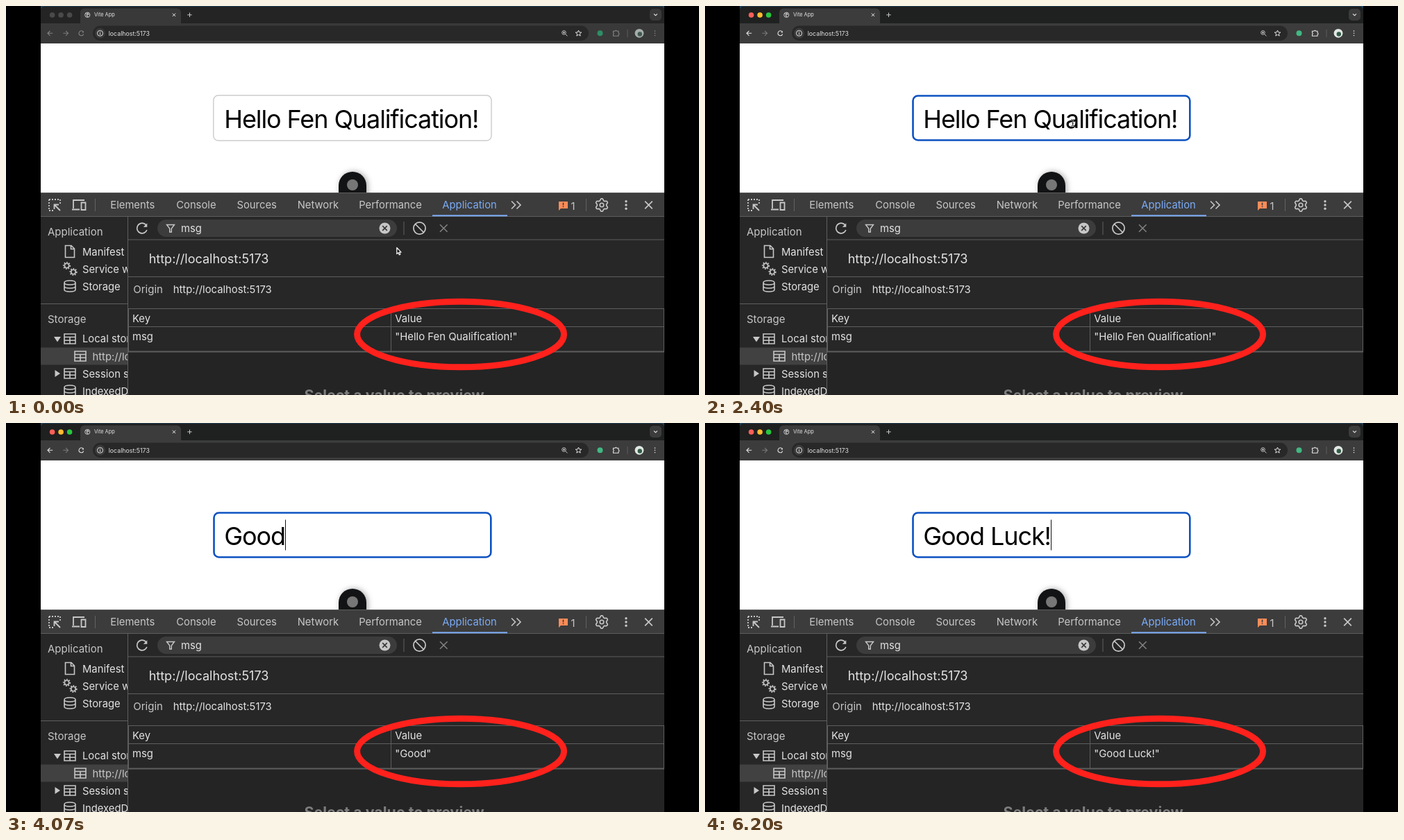
Animation of 998x561 px, one loop 6.33 s. Source, as an HTML page with a canvas:

```html
<!DOCTYPE html>
<html lang="en">
<head>
<meta charset="utf-8">
<title>Saved message</title>
<style>
html, body { margin: 0; width: 100%; height: 100%; overflow: hidden; background: #000; }
canvas { display: block; width: 998px; height: 561px; }
</style>
</head>
<body>
<canvas id="stage"></canvas>
<script>
const W = 998, H = 561, LOOP = 6330;
const canvas = document.getElementById('stage');
const ctx = canvas.getContext('2d');
const dpr = window.devicePixelRatio || 1;
canvas.width = W * dpr;
canvas.height = H * dpr;

const LIGHT = '#e3e3e3', GREY = '#c7c7c7', BAR = '#3c3c3c', PANEL = '#272727', LINE = '#5e5e5e', BLUE = '#7cacf8';
const GREETING = 'Hello Fen Qualification!';
const FAREWELL = 'Good Luck!';
const TYPED = [3330, 3600, 3930, 4070, 4200, 4470, 4600, 4730, 4870, 5200];
const SAVED = [3330, 3670, 3930, 4070, 4200, 4470, 4600, 4800, 4870, 5200];

function rect(x, y, w, h, color) {
  ctx.fillStyle = color;
  ctx.fillRect(x, y, w, h);
}

function round(x, y, w, h, r, color) {
  ctx.beginPath();
  ctx.roundRect(x, y, w, h, r);
  ctx.fillStyle = color;
  ctx.fill();
}

function disc(x, y, r, color) {
  ctx.beginPath();
  ctx.arc(x, y, r, 0, 7);
  ctx.fillStyle = color;
  ctx.fill();
}

function ring(x, y, r, color, width) {
  ctx.beginPath();
  ctx.arc(x, y, r, 0, 7);
  ctx.strokeStyle = color;
  ctx.lineWidth = width;
  ctx.stroke();
}

// Strokes, and optionally fills, an SVG path placed at x, y.
function icon(x, y, d, color, width = 1.5, fill) {
  const path = new Path2D(d);
  ctx.save();
  ctx.translate(x, y);
  if (fill) {
    ctx.fillStyle = fill;
    ctx.fill(path);
  }
  if (width) {
    ctx.strokeStyle = color;
    ctx.lineWidth = width;
    ctx.stroke(path);
  }
  ctx.restore();
}

function font(size, weight = 400, spacing = 0) {
  ctx.font = `${weight} ${size}px Inter, "Open Sans", sans-serif`;
  ctx.letterSpacing = spacing + 'px';
}

// y is the middle of the capital letters.
function text(str, x, y, color = LIGHT, size = 14.8, weight = 400) {
  font(size, weight);
  ctx.fillStyle = color;
  ctx.fillText(str, x, y + size * 0.364);
}

function mix(from, to, a) {
  const parts = from.map((v, i) => Math.round(v + (to[i] - v) * a));
  return `rgb(${parts.join()})`;
}

function cross(x, y, r, color, width) {
  icon(x, y, `M${-r} ${-r}L${r} ${r}M${r} ${-r}L${-r} ${r}`, color, width);
}

function dots(x, y, gap, r, color) {
  for (let i = -1; i <= 1; i++) disc(x, y + i * gap, r, color);
}

function reload(x, y, r, color, width) {
  ctx.beginPath();
  ctx.arc(x, y, r, 0.35, 5.6);
  ctx.strokeStyle = color;
  ctx.lineWidth = width;
  ctx.stroke();
  icon(x, y, `M${r} ${-r}V${-r * 0.25}H${r * 0.25}Z`, color, 0, color);
}

function browser(a) {
  rect(50, 0, 898, H, '#1d4664');
  round(50, 0.7, 898, 570, 5, mix([36, 36, 36], [31, 32, 32], a));
  const lit = mix([132, 132, 132], [227, 227, 227], a);
  const tool = mix([57, 57, 57], [60, 60, 60], a);

  [[255, 95, 87], [254, 188, 46], [40, 200, 64]].forEach((c, i) =>
    disc(66.6 + i * 12.5, 13, 3.8, mix([74, 74, 74], c, a)));

  round(107, 3.5, 145, 28, 6, tool);
  rect(50, 25, 898, 29, tool);
  ring(117.3, 12.8, 3.6, GREY, 1);
  icon(117.3, 12.8, 'M-3 -2L0 -1L-1 1L1 3M0 -3L2 0', GREY, 1.2);
  text('Vite App', 127, 12.7, LIGHT, 7.4);
  cross(242, 12.8, 2.2, LIGHT, 1);
  icon(264.5, 12.8, 'M-3.2 0H3.2M0 -3.2V3.2', GREY, 1);
  round(927, 4, 17, 17, 5, tool);
  icon(935.5, 12.5, 'M-2.5 -1.2L0 1.2L2.5 -1.2', LIGHT, 1.1);

  icon(63.5, 39.3, 'M3.7 0H-3.5M0 -3.5L-3.5 0L0 3.5', lit, 1.1);
  icon(86, 39.3, 'M-3.7 0H3.5M0 -3.5L3.5 0L0 3.5', '#7b7b7b', 1.1);
  reload(108.5, 39.3, 3.4, lit, 1.1);

  round(125, 28.5, 714, 21.5, 10.75, '#282828');
  disc(135.5, 39.3, 7.5, tool);
  ring(135.5, 39.3, 4, LIGHT, 1);
  icon(135.5, 39.3, 'M0 -2.3V-1.2M0 -.4V2.3', LIGHT, 1);
  text('localhost:5173', 147.7, 39.3, LIGHT, 8.8);
  ring(803.5, 38.4, 2.8, GREY, 1);
  icon(803.5, 38.4, 'M2 2L5 5M-1.5 0H1.5M0 -1.5V1.5', GREY, 1);
  icon(824.5, 39.3, 'M0 -4.3L1.2 -1.4L4.3 -1.2L1.9 .8L2.7 3.8L0 2.1L-2.7 3.8L-1.9 .8L-4.3 -1.2L-1.2 -1.4Z', LIGHT, 1);

  disc(855.5, 39.3, 4, mix([45, 142, 102], [65, 184, 131], a));
  icon(878.5, 39.3, 'M-4 -3H-1.5A1.4 1.4 0 0 1 1.2 -3H3.5V-.7A1.4 1.4 0 0 1 3.5 2V4H-4V1.8A1.4 1.4 0 0 0 -4 -.7Z', lit, 1.1);
  rect(894.5, 34, 1, 11, '#5c5c5c');
  disc(912, 39.3, 6.4, mix([165, 173, 170], [225, 232, 228], a));
  disc(912.8, 40.5, 3.2, mix([65, 88, 77], [52, 92, 72], a));
  dots(934.5, 39.3, 3.2, 0.8, lit);
}

function page(t, value) {
  rect(50, 54, 898, 215, '#fff');
  const focused = t >= 2400;
  const width = focused ? 2.6 : 1.2;
  ctx.beginPath();
  ctx.roundRect(298.2 + width / 2, 128.2 + width / 2, 401.4 - width, 66.6 - width, 7);
  ctx.strokeStyle = focused ? '#0b51c1' : '#c2c2c2';
  ctx.lineWidth = width;
  ctx.stroke();

  font(36, 400, -1.1);
  const end = 314.3 + ctx.measureText(value).width;
  if (t >= 2530 && t < 3330) rect(314.3, 139, end - 314.3, 45, '#accfff');
  ctx.fillStyle = '#000';
  ctx.fillText(value, 314.3, 176.3);
  const blinkOff = t >= 5670 && t < 6200;
  if (t >= 3330 && !blinkOff) rect(Math.round(end), 139.5, 1, 44, '#111');

  ctx.save();
  ctx.beginPath();
  ctx.rect(50, 54, 898, 215);
  ctx.clip();
  ctx.shadowColor = 'rgba(0,0,0,.35)';
  ctx.shadowBlur = 9 * dpr;
  ctx.shadowOffsetX = 2 * dpr;
  round(479, 239, 40, 40, [20, 20, 0, 0], '#121314');
  ctx.restore();
  disc(499, 258, 8, '#777');
}

function tabBar() {
  rect(50, 269, 898, 35, BAR);
  rect(50, 269, 898, 1, LINE);
  rect(50, 303, 898, 1, LINE);

  ctx.setLineDash([2, 2]);
  icon(70, 287, 'M-8 -8H8V-1M-8 -8V8H-1', GREY, 1.8);
  ctx.setLineDash([]);
  icon(70, 287, 'M8 8L0 0M-.5 6V-.5H6', GREY, 1.8);
  icon(105, 287, 'M-8 5V-7H8M-10 6.5H1M3.5 -3.5H9.5V7H3.5Z', GREY, 1.8);
  rect(128, 278, 1, 18, '#626262');

  [['Elements', 150.3], ['Console', 245.2], ['Sources', 332.5], ['Network', 419.7], ['Performance', 508.2]]
    .forEach(([name, x]) => text(name, x, 287, GREY));
  text('Application', 628.3, 287, BLUE);
  rect(614, 301.3, 108, 2, BLUE);
  icon(735, 287, 'M-7 -5.5L-1.5 0L-7 5.5M.5 -5.5L6 0L.5 5.5', GREY, 1.6);

  icon(796, 282, 'M0 0H13V10H3L0 13Z', '', 0, '#fe8d59');
  rect(801.7, 283.5, 1.6, 4, BAR);
  rect(801.7, 288.6, 1.6, 1.6, BAR);
  text('1', 813.5, 288.3, GREY);
  rect(835, 278, 1, 18, '#626262');

  ctx.beginPath();
  for (let i = 0; i <= 48; i++) {
    const angle = i / 48 * Math.PI * 2;
    const r = 7.9 + 1.2 * Math.tanh(3 * Math.cos(angle * 6 + Math.PI));
    ctx.lineTo(858 + r * Math.cos(angle), 287 + r * Math.sin(angle));
  }
  ctx.strokeStyle = GREY;
  ctx.lineWidth = 1.6;
  ctx.stroke();
  ring(858, 287, 2.8, GREY, 1.6);
  dots(893, 287, 5.2, 1.7, GREY);
  cross(925.5, 287, 5.3, GREY, 1.7);
}

function database(y) {
  icon(92, y, 'M-8 -5C-8 -9 8 -9 8 -5V5C8 9 -8 9 -8 5ZM-8 -5C-8 -1 8 -1 8 -5M-8 0C-8 4 8 4 8 0', GREY, 1.6);
}

function table(x, y) {
  icon(x, y, 'M-8 -7H8V7H-8ZM-8 -2.5H8M-8 2.3H8M0 -2.5V7', GREY, 1.6);
}

function cog(x, y) {
  ring(x, y, 3.2, GREY, 1.6);
  ctx.setLineDash([1.7, 1.9]);
  ring(x, y, 4.8, GREY, 1.6);
  ctx.setLineDash([]);
}

function sidebar() {
  ctx.save();
  ctx.beginPath();
  ctx.rect(50, 304, 125, 257);
  ctx.clip();
  rect(50, 492.5, 125, 25, '#414141');
  rect(50, 429, 125, 1, LINE);
  text('Application', 60, 325.7, GREY, 15);
  icon(92, 354, 'M-6.5 -8.5H2L6.5 -4V8.5H-6.5ZM1.5 -8V-3.5H6', GREY, 1.6);
  cog(87.5, 374.5);
  cog(97, 383.5);
  database(404);
  text('Manifest', 110, 354.3);
  text('Service workers', 110, 379.5);
  text('Storage', 110, 404.5);
  text('Storage', 60, 451.8, GREY, 15);
  icon(74, 480.5, 'M-5 -3.5H5L0 4Z', '', 0, GREY);
  table(92, 480);
  text('Local storage', 110, 480);
  table(107, 505);
  text('http://localhost:5173', 124.5, 505.3, GREY);
  icon(74, 530, 'M-3.5 -5V5L4 0Z', '', 0, GREY);
  table(92, 530);
  text('Session storage', 110, 530.3);
  database(555);
  text('IndexedDB', 110, 555.3);
  ctx.restore();
  rect(175, 304, 1, 257, LINE);
}

function storage(saved) {
  reload(196, 320.5, 7.3, GREY, 1.7);
  round(218, 308, 345, 25, 12.5, BAR);
  icon(237, 320.5, 'M-5.5 -5H5.5L1.3 .5V5.5H-1.3V.5Z', GREY, 1.4);
  text('msg', 252, 320.7);
  disc(545.5, 320.5, 8, GREY);
  cross(545.5, 320.5, 3.3, BAR, 1.7);
  rect(572.5, 311, 1, 19, '#626262');
  ring(595.5, 320.5, 8.6, GREY, 1.7);
  icon(595.5, 320.5, 'M-6 -6L6 6', GREY, 1.7);
  cross(630.3, 320.5, 5.3, '#818181', 1.6);
  rect(176, 336.5, 772, 1, LINE);

  text('http://localhost:5173', 205.7, 364.5, LIGHT, 18);
  rect(176, 390, 772, 1, LINE);
  text('Origin', 183.3, 409, GREY, 15);
  text('http://localhost:5173', 240.7, 409);

  rect(176, 499, 772, 62, '#242424');
  rect(176, 436, 772, 1, LINE);
  rect(176, 462, 772, 1, LINE);
  rect(176, 497.5, 772, 2, LINE);
  rect(176, 436, 1, 62, LINE);
  rect(554, 436, 1, 62, LINE);
  rect(947, 436, 1, 62, LINE);
  text('Key', 182, 450.3);
  text('Value', 560.3, 450.3);
  text('msg', 182, 476.7);
  text(`"${saved}"`, 560.3, 476.7, LIGHT, 14.9);
  text('Select a value to preview', 429.5, 561, '#7d7d7d', 21.4, 700);
}

function arrow(x, y) {
  ctx.lineJoin = 'round';
  icon(x, y, 'M0 0V9L2.1 7.2L3.5 10.3L5 9.6L3.6 6.6H6.3Z', '#eee', 1.3, '#111');
  ctx.lineJoin = 'miter';
}

function beam(x, y) {
  const d = 'M-2.3 -4.7Q0 -4.7 0 -3V3Q0 4.7 -2.3 4.7M2.3 -4.7Q0 -4.7 0 -3M0 3Q0 4.7 2.3 4.7M-1 1H1';
  icon(x, y, d, 'rgba(255,255,255,.8)', 2);
  icon(x, y, d, '#222', 1);
}

function pointer(t) {
  if (t < 1070) arrow(562.8, 348.5);
  else if (t < 1130) arrow(544.7, 249.6);
  else if (t < 3330) beam(529.7, 168.3);
}

function draw(t) {
  const count = times => times.filter(at => t >= at).length;
  const shown = times => t < 3330 ? GREETING : FAREWELL.slice(0, count(times));
  const active = t < 1800 ? 0 : Math.min(1, (Math.floor((t - 1800) / 67.5) + 1) / 5);

  ctx.setTransform(dpr, 0, 0, dpr, 0, 0);
  rect(0, 0, W, H, '#000');
  browser(active);
  page(t, shown(TYPED));
  rect(50, 269, 898, 292, PANEL);
  tabBar();
  sidebar();
  storage(shown(SAVED));

  ctx.beginPath();
  ctx.ellipse(654.6, 473.5, 149, 47.3, 0, 0, 7);
  ctx.strokeStyle = '#ff211c';
  ctx.lineWidth = 9;
  ctx.stroke();
  pointer(t);
}

const start = performance.now();
function tick() {
  draw((performance.now() - start) % LOOP);
  requestAnimationFrame(tick);
}
tick();
</script>
</body>
</html>
```
